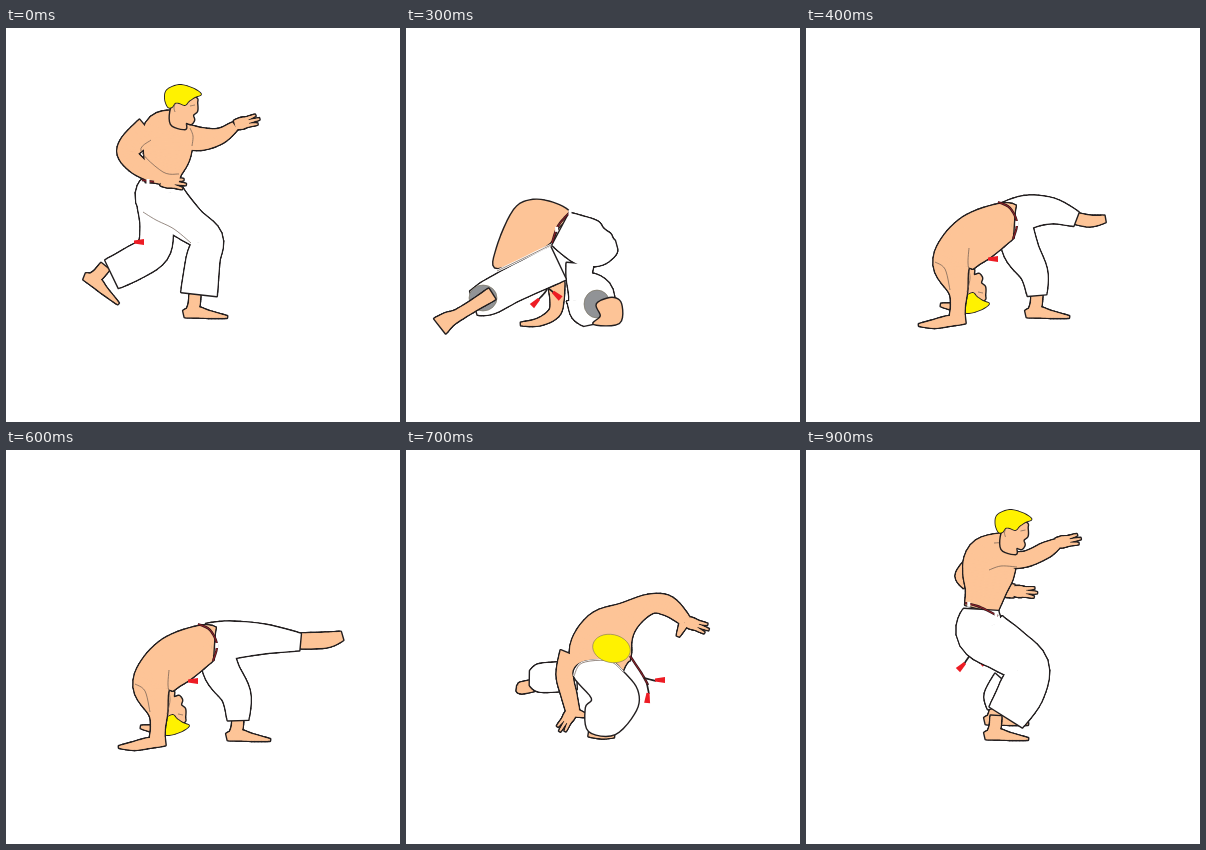
An HTML page with a canvas for the animation above (1.4 s loop, 394 px wide and 394 px high).

```html
<!DOCTYPE html>
<html lang="en">
<head>
<meta charset="utf-8">
<title>Acrobat</title>
<style>
html, body { margin: 0; width: 100%; height: 100%; overflow: hidden; background: #fff; }
canvas { display: block; width: 394px; height: 394px; }
</style>
</head>
<body>
<canvas></canvas>
<script>
const SIZE = 394, LOOP = 1400, STEPS = 6, LINE = 1.4;
const INK = '#231f20', SKIN = '#fdc497', WHITE = '#fff', YELLOW = '#fff200', RED = '#ed1c24', GREY = '#919396';
const canvas = document.querySelector('canvas');
const ctx = canvas.getContext('2d');
const ratio = window.devicePixelRatio || 1;
canvas.width = canvas.height = SIZE * ratio;

// Catmull-Rom samples through knots of any dimension.
function spline(text, closed = false) {
  const knots = text.split(' ').map(k => k.split(',').map(Number));
  const n = knots.length;
  const knot = i => knots[closed ? (i + n) % n : Math.max(0, Math.min(n - 1, i))];
  const samples = [];
  for (let i = 0; i < (closed ? n : n - 1); i++) {
    const [a, b, c, d] = [i - 1, i, i + 1, i + 2].map(knot);
    for (let s = 0; s < STEPS; s++) {
      const t = s / STEPS;
      samples.push(b.map((v, k) => v + t / 2 * (c[k] - a[k]
        + t * (2 * a[k] - 5 * v + 4 * c[k] - d[k] + t * (3 * (v - c[k]) + d[k] - a[k])))));
    }
  }
  if (!closed) samples.push(knots[n - 1]);
  return samples;
}

function polygon(points, closed = true) {
  const path = new Path2D();
  points.forEach(([x, y]) => path.lineTo(x, y));
  if (closed) path.closePath();
  return path;
}

const blob = text => [polygon(spline(text, true))];

// A limb: a centre line of x,y,radius swept into overlapping slices.
function tube(text) {
  const samples = spline(text);
  const edges = samples.map(([x, y, r], i) => {
    const a = samples[Math.max(0, i - 1)], b = samples[Math.min(samples.length - 1, i + 1)];
    const dx = b[0] - a[0], dy = b[1] - a[1], k = (r - LINE / 2) / Math.hypot(dx, dy);
    return [[x - dy * k, y + dx * k], [x + dy * k, y - dx * k]];
  });
  return edges.slice(2).map((_, i) => {
    const part = edges.slice(i, i + 3);
    return polygon([...part.map(e => e[0]), ...part.map(e => e[1]).reverse()]);
  });
}

function at(paths, x, y, degrees = 0, flip = 1) {
  const matrix = new DOMMatrix().translate(x, y).rotate(degrees).scale(1, flip);
  return paths.map(path => {
    const moved = new Path2D();
    moved.addPath(path, matrix);
    return moved;
  });
}

// Fills several parts as one silhouette with a shared outline.
function paint(color, ...parts) {
  const paths = parts.flat();
  ctx.strokeStyle = INK;
  ctx.lineWidth = 2 * LINE;
  paths.forEach(path => ctx.stroke(path));
  ctx.fillStyle = color;
  paths.forEach(path => ctx.fill(path));
}

function line(text, color = '#6b5a50', width = 0.7) {
  ctx.strokeStyle = color;
  ctx.lineWidth = width;
  ctx.stroke(polygon(spline(text), false));
}

function seam(text) {
  line(text, WHITE, 2.4);
  line(text);
}

function oval(color, x, y, rx, ry, degrees = 0) {
  ctx.beginPath();
  ctx.ellipse(x, y, rx, ry, degrees * Math.PI / 180, 0, 2 * Math.PI);
  ctx.fillStyle = color;
  ctx.fill();
  ctx.strokeStyle = '#77705c';
  ctx.lineWidth = 0.6;
  ctx.stroke();
}

function belt(text, ...buckles) {
  line(text, '#33191d', 2.4);
  line(text, '#a3202a', 0.9);
  const samples = spline(text);
  ctx.fillStyle = WHITE;
  for (const part of buckles) {
    const [x, y] = samples[Math.round(part * (samples.length - 1))];
    ctx.fillRect(x - 1.5, y - 2, 3, 5);
  }
}

const cord = text => line(text, INK, 1.7);

function placed(x, y, degrees, flip, drawing) {
  ctx.save();
  ctx.translate(x, y);
  ctx.rotate(degrees * Math.PI / 180);
  ctx.scale(1, flip);
  drawing();
  ctx.restore();
}

const tassel = (x, y, degrees) => placed(x, y, degrees, 1, () => {
  ctx.fillStyle = RED;
  ctx.fill(polygon([[0, -1.5], [10, -3], [10, 3], [0, 1.5]]));
});

const foot = [...tube('0,-2,6 -1,9,6 -4,17,6'), ...tube('-11,18,4 0,16,6 14,18.5,4 32,21,1.5')];
const hand = [...tube('0,0,5 7,0,6 14,0,5'),
  ...[-1, 0, 1].flatMap(s => tube(`11,${s * 3},2.2 ${25 - 3 * Math.abs(s)},${s * 4.5},1.4`))];
const face = blob('-11,2 0,-8 13,-6 14,-1 14,7 10,11 11,16 8,20 3,19 2,25 -12,20');
const hairCap = blob('-15,3 -18,-5 -16,-14 -4,-19 9,-16 18,-10 12,-7 6,-3 2,1 -4,-1 -8,-1 -11,3');

const head = (x, y, flip = 1) => placed(x, y, 0, flip, () => {
  paint(SKIN, face);
  ctx.lineWidth = 1.8;
  ctx.stroke(hairCap[0]);
  ctx.fillStyle = YELLOW;
  ctx.fill(hairCap[0]);
  line('-8,0 -9,4 -8,8');
  line('7,2 12,1');
});

function lunge() {
  paint(SKIN, at(foot, 98, 240, 35));
  paint(SKIN, at(foot, 189, 268));
  paint(WHITE, tube('155,155,19 155,171,25 182,195,18 201,211,16 197,232,17 193,266,18.5'),
    tube('152,178,21 151,200,17 147,222,17 126,236,17 106,246,16'));
  line('137,184 150,192 168,201 185,215');
  paint(SKIN, tube('174,88,9 163,103,25 161,125,24 157,143,19 156,155,17'),
    tube('142,102,14 125,117,12 122,127,10 135,140,9 156,151,6'), at(hand, 155, 153, 8),
    tube('176,108,13 195,111,11.5 214,108,8 229,98,5'), at(hand, 229, 97, -14));
  line('184,100 187,108 186,118');
  line('145,112 135,123 157,144 173,146');
  head(177, 76);
  belt('136,152 148,154', 0.5);
  tassel(128, 214, 0);
}

function backbend() {
  paint(SKIN, blob('140,212 122,197 119,181 130,166 160,158 186,153 210,161 222,180 200,195 150,205'),
    tube('214,184,11 222,200,8 229,216,8 229,233,6'));
  line('126,181 141,204');
  belt('141,207 138,222');
  paint(WHITE, tube('143,212,8 168,210,16 196,203,13'),
    tube('168,210,18 152,230,18 133,249,21 126,262,19 121,276,8'),
    tube('178,207,18 200,222,20 217,243,22 214,262,26 204,281,20'));
  oval(GREY, 128, 259, 15, 16);
  oval(GREY, 204, 271, 15, 13, 35);
  paint(SKIN, tube('130,252,8 124,266,8 114,279,9 110,285,9'));
  paint(SKIN, tube('207,265,6 197,274,8 188,284,7'), tube('181,285,5 200,284,6 221,291,1.5'));
  line('126,237 138,233 150,236');
  line('190,258 200,250 217,247 236,251');
  belt('143,204 165,194 194,190', 0.2, 0.65);
  tassel(147, 261, 0);
}

function bridge() {
  paint(SKIN, tube('150,254,9 151,272,7 148,285,6 133,294,4 115,296,2'));
  cord('140,258 140,263 132,272');
  cord('141,259 148,265');
  tassel(133, 271, 135);
  tassel(147, 264, 40);
  paint(SKIN, blob('92,240 91,220 108,182 127,172 150,176 164,186 152,200 140,218'));
  paint(WHITE, tube('152,235,19 108,256,17.5 82,270,17 68,275,13'),
    tube('155,201,19 178,213,24 192,218,21 205,218,13 210,217,5'),
    tube('174,236,14 174,250,14 184,268,24 184,285,20 186,296,9'));
  seam('91,243 145,217');
  oval(GREY, 77, 270, 14, 13);
  oval(GREY, 191, 276, 13, 14);
  paint(SKIN, tube('86,266,7 70,276,6 52,287,6 42,292,8 34,298,10'));
  paint(SKIN, blob('191,276 206,270 215,276 213,295 188,296 195,288'));
  belt('164,184 152,198 146,215', 0, 0.6);
}

// Upper body rests on both hands; only legs and feet differ.
const onHands = (legs, feet) => () => {
  feet.forEach(part => paint(SKIN, part));
  paint(WHITE, ...legs.map(tube));
  paint(SKIN, tube('148,279,4 135,277,2'));
  head(165, 266, -1);
  paint(SKIN, tube('208,192,14 200,193,19 174,207,24.5 155,222,23 146,238,19 152,262,10 152,277,7.5 151,290,8'),
    tube('159,291,5 143,293,5.5 128,296,4.5 113,297,1.5'));
  line('163,220 162,235 164,250 161,264');
  line('129,234 139,241 144,262');
  belt('192,174 204,180 211,195 207,211', 0.65);
  tassel(182, 231, 0);
};

const kickOff = onHands(
  ['203,193,20 222,184,17 246,183,13 270,191,8', '210,200,17 215,222,18 228,245,14 231,267,10'],
  [tube('268,190,6 284,193,6 299,191,4'), at(foot, 231, 268)]);
const handstand = onHands(
  ['203,195,20 218,184,20 237,155,17 254,134,17 266,127,10',
    '210,200,17 211,218,18 221,237,20 241,241,21 258,241,14 268,241,7'],
  [tube('267,124,5 279,116,6 290,113,5.5 297,117,2'), tube('266,242,7 275,242,7 281,240,3')]);
const sweep = onHands(
  ['203,193,20 225,190,19 258,189,15 294,192,9', '210,200,17 216,222,18 230,245,15 232,270,11'],
  [tube('292,191,8 320,190,8 336,186,5'), at(foot, 232, 269)]);

function turn() {
  paint(SKIN, tube('130,235,6 115,238,6 111,238,3'));
  paint(SKIN, tube('183,283,4 196,285,4 208,286,2'));
  paint(WHITE, tube('170,226,14 150,227,15 132,228,14 124,228,8'));
  paint(SKIN, tube('193,222,24 194,203,31 204,182,27 222,166,15 244,154,10 262,156,10 280,171,6'),
    at(hand, 279, 171, 20), tube('278,173,5 272,186,2'),
    tube('166,205,13 159,225,9 163,245,8 167,262,7'), at(hand, 167, 260, 122), tube('167,262,5 181,266,2'));
  paint(WHITE, blob('168,226 176,213 203,211 217,222 231,240 230,260 209,284 183,281 180,258 186,248'));
  seam('168,226 176,213 203,211 217,222');
  belt('224,206 236,224 242,235');
  cord('238,228 250,231');
  cord('241,234 243,244');
  tassel(249, 230, 0);
  tassel(242, 243, 95);
  oval(YELLOW, 205.5, 198.5, 19, 14, 12);
}

function standTop() {
  paint(SKIN, tube('160,114,4 154,126,5 160,136,4'));
  paint(SKIN, tube('195,140,7 208,141,7'), at(hand, 206, 141, 4));
  paint(SKIN, tube('201,90,10 186,107,25 182,125,25.5 179,143,20 175,159,17'),
    tube('200,110,9 220,109,8 240,100,8 252,93,5'), at(hand, 250, 93, -10));
  line('183,120 195,116 211,117');
  line('188,93 197,93 204,97');
  head(207.5, 79);
}

function standLegs() {
  paint(SKIN, at(foot, 190, 253));
  cord('164,205 158,214');
  cord('164,205 172,210');
  tassel(159, 213, 135);
  tassel(171, 208, 40);
  paint(WHITE, tube('196,230,10 184,245,6 186,258,5'));
  paint(SKIN, at(foot, 190, 268));
  paint(WHITE, tube('175,160,18 176,182,26 200,199,24 222,217,21 215,242,23 200,267,20'));
  belt('159,153 174,157 192,166', 0.2, 0.95);
}

function stand() {
  standTop();
  standLegs();
}

function rise() {
  placed(167, 166, 40, 1, () => {
    ctx.translate(-175, -158);
    standTop();
  });
  placed(-15, 0, 0, 1, standLegs);
}

const poses = [[0, lunge], [100, backbend], [300, bridge], [400, kickOff], [500, handstand],
  [600, sweep], [700, turn], [800, rise], [900, stand]];

const start = performance.now();
function render() {
  const time = (performance.now() - start) % LOOP;
  const [, pose] = poses.filter(([from]) => from <= time).pop();
  ctx.setTransform(ratio, 0, 0, ratio, 0, 0);
  ctx.fillStyle = WHITE;
  ctx.fillRect(0, 0, SIZE, SIZE);
  ctx.lineJoin = 'round';
  pose();
  requestAnimationFrame(render);
}
render();
</script>
</body>
</html>
```
